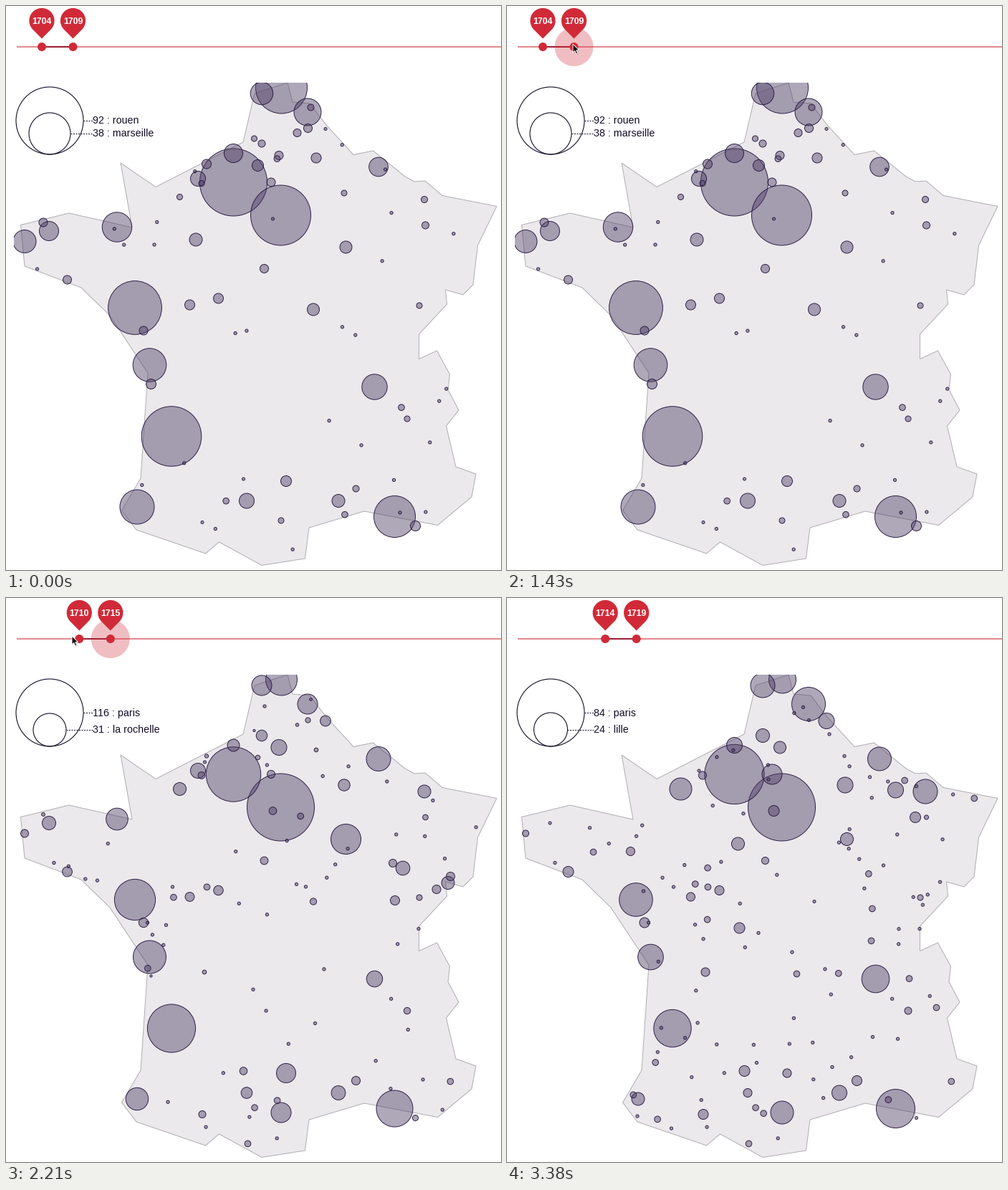
Animation, 691 px wide and 787 px high, one loop 3.51 s. Source, as a matplotlib script:

```python
import numpy as np
import matplotlib.pyplot as plt
from matplotlib.animation import FuncAnimation
from matplotlib.patches import Circle, Polygon, Rectangle
from matplotlib.path import Path

W, H, DPI = 691, 787, 64
PX = 72 / DPI  # points per pixel
FRAMES, STEP = 27, 130
RED, INK = "#d02a38", "#140c26"
YEARS = np.array([1704, 1706, 1710, 1714])
rng = np.random.default_rng(12)

COAST = [
    (393, 107), (347, 122), (331, 190), (209, 252.5), (160, 219),
    (176, 309), (88, 289), (20.5, 305.5), (26, 363), (105, 393),
    (145, 432), (198, 512), (188, 659), (161.5, 704), (182, 731),
    (278.5, 764), (297.5, 748), (357, 780.5), (417.5, 771), (423, 728),
    (500, 705), (602.5, 724.5), (650, 685), (656, 653), (628, 643),
    (614.5, 586), (632, 564), (617, 535.5), (619.5, 514), (601.5, 481),
    (576.5, 492.5), (576.5, 458), (615.5, 416), (613.5, 396), (638, 403),
    (652, 389), (658.5, 334), (685, 279.5), (609, 264.5), (585, 244),
    (570, 245), (557, 238), (512.5, 202), (485, 207.5), (447, 166),
    (424, 136), (400, 134),
]

# Cities: x, y, radius at each of the four key years
CITIES = [
    (357, 122, 15.7, 18, 14, 17), (384.5, 114, 36, 31, 22, 19),
    (421, 148, 19, 19, 14, 23.5), (381, 208.5, 6, 8.5, 11, 8.5),
    (317.5, 205.5, 13, 12.5, 8.5, 11), (370, 246, 6, 6.5, 5.5, 14),
    (268, 241, 10.5, 14.5, 10.5, 2), (317.5, 246, 47, 45, 38.2, 41.6),
    (383.5, 292, 42, 47, 47, 47), (520, 224.5, 13.3, 18, 17, 16.5),
    (584, 270, 4.5, 5.5, 9, 17), (474.5, 336.5, 8.5, 14.5, 21, 9),
    (155, 308.5, 20.7, 24.5, 15.3, 0), (26, 328.5, 16, 14, 5.5, 4.5),
    (60, 314, 13.5, 14, 9.5, 2), (180, 421, 37.4, 35.8, 28.6, 23.3),
    (200.5, 501, 23.3, 24.8, 23, 17.8), (231, 600.5, 41.8, 42.2, 33.6, 26.2),
    (514.5, 531.5, 17.7, 18, 11.2, 19.3), (183, 699, 24, 23, 15.7, 9),
    (542.5, 712.5, 29, 25.9, 25.5, 27), (384, 718, 4, 9.5, 14, 16),
    (391, 663, 7.5, 12, 13.5, 6), (242.5, 266.5, 4, 4, 9, 15.5),
]

# Towns: x, y, first and last radius, changing steadily
TOWNS = [
    (351.5, 222.5, 8, 0), (425.5, 141.5, 4.5, 0), (346.5, 185, 4, 0),
    (357, 192, 5, 9.5), (406.5, 177, 5.5, 0), (421.5, 170.5, 6, 2),
    (446, 171.5, 2, 11), (433, 212, 7, 0), (280, 220.5, 6.5, 0),
    (273, 247.5, 4, 5.5), (372.5, 297, 2, 7.5), (472, 261, 4, 11),
    (585.5, 306, 5, 3), (570, 306, -8, 7.5), (542.5, 268, -16, 11),
    (322.5, 343, -13, 9), (324.5, 460.5, -11, 7.5), (429, 423.5, 8.5, 2),
    (577, 418, 4, 4), (85.5, 382, 6, 7.5), (52, 302, 6, 0),
    (265, 326, 9, -4), (192, 453, 6, 7), (256.5, 417, 7, 6),
    (296.5, 408, 7, 6.5), (202.5, 527.5, 7, -2), (560, 576, 4, 5),
    (331.5, 660, 2, 7.5), (336, 690.5, 10.5, 6), (464, 690.5, 9, 10.5),
    (488.5, 673.5, 4.5, 7), (571.5, 725.5, 7, 2), (274, 720.5, 2, 7),
    (360.5, 366.5, 6, 5), (277, 522, -2, 6), (172.5, 353.5, -9, 6),
]

# Towns seen only around the two middle key years: x, y, radius
MIDDLE = [
    (554, 377, 9.8), (617, 397.5, 9), (540, 370, 5.5), (601, 406.5, 6),
    (620.5, 388.5, 6), (543, 422, 6.5),
]

# How many villages live from one key year to another
LIVES = {(0, 1): 26, (0, 0): 5, (1, 2): 16, (2, 2): 18, (2, 3): 22, (3, 3): 78}


def random_spots(n):
    """Points spread over the land, not too close to each other."""
    inside, spots = Path(COAST), []
    while len(spots) < n:
        p = rng.uniform((20, 150), (680, 770))
        if inside.contains_point(p) and all(np.hypot(*(p - q)) > 13 for q in spots):
            spots.append(p)
    return np.array(spots)


def village_radii():
    rows = []
    for (first, last), n in LIVES.items():
        alive = (np.arange(4) >= first) & (np.arange(4) <= last)
        rows += [alive * (4.3 if rng.random() < 0.15 else 2.1) for _ in range(n)]
    return np.array(rows)


def build_sites():
    cities, towns, middle = map(np.array, (CITIES, TOWNS, MIDDLE))
    t = (YEARS - YEARS[0]) / (YEARS[-1] - YEARS[0])
    steady = towns[:, 2:3] * (1 - t) + towns[:, 3:] * t
    steady[steady < 1.5] = 0
    village = village_radii()
    spots = np.vstack([cities[:, :2], towns[:, :2], middle[:, :2],
                       random_spots(len(village))])
    radii = np.vstack([cities[:, 2:], steady, middle[:, 2:] * [0, 1, 1, 0],
                       village])
    return spots, radii


spots, radii = build_sites()
switch = rng.uniform(0.1, 0.9, len(spots))

TOP = [(92, "rouen"), (117, "paris"), (116, "paris"), (84, "paris")]
LOW = [(38, "marseille"), (38, "marseille"), (31, "la rochelle"), (24, "lille")]
LOW_R = [29, 25.7, 23, 23.5]


def first_year(i):
    if i < 13:
        return 1704
    if i < 18:
        return 1706 + i - 13
    return 1712 if i == 18 else 1714


def pointer(i):
    """Tip of the arrow: slides in, holds the knob, drops out below."""
    if 4 <= i < 8:
        u = (8 - i) / 4
        return 92 - 34 * u, 53 + 277 * u ** 3
    if 8 <= i <= 22:
        return 92, 53
    if 23 <= i <= 25:
        u = (i - 22) / 3
        return 92 + 24 * u, 53 + 717 * u ** 1.7
    return None


def halo_radius(i):
    grow = 1 - np.clip((11 - i) / 4, 0, 1) ** 2
    return 27 * grow * np.clip((22 - i) / 2, 0, 1)


def segment(year):
    k = min(np.searchsorted(YEARS, year, side="right") - 1, 2)
    return k, (year - YEARS[k]) / (YEARS[k + 1] - YEARS[k])


def radii_at(k, t):
    a, b = radii[:, k], radii[:, k + 1]
    steady = (a > 0) & (b > 0)
    return np.where(steady, a + (b - a) * t, np.where(t > switch, b, a))


def label_at(rows, k, t):
    n = rows[k][0] + (rows[k + 1][0] - rows[k][0]) * t
    return f"{round(n)} : {rows[k + (t >= 0.5)][1]}"


fig = plt.figure(figsize=(W / DPI, H / DPI), dpi=DPI, facecolor="white")
ax = fig.add_axes([0, 0, 1, 1])
ax.set_xlim(0, W)
ax.set_ylim(H, 0)
ax.axis("off")


def line(xs, ys, color, width, z, **kw):
    return ax.plot(xs, ys, color=color, lw=width * PX, zorder=z,
                   solid_capstyle="butt", **kw)[0]


def shape(patch, z):
    patch.set_zorder(z)
    return ax.add_patch(patch)


def text(x, y, size, color, **kw):
    return ax.text(x, y, "", fontsize=size * PX, color=color, zorder=8,
                   family="Liberation Sans", **kw)


# Map
frame = Rectangle((11, 107), W - 11, H - 107, transform=ax.transData)
land = shape(Polygon(COAST, fc="#ebe9ec", ec="#b0aeb2", lw=PX), 1)
land.set_clip_path(frame)
bubbles = ax.scatter(spots[:, 0], spots[:, 1], s=1, zorder=2, lw=PX,
                     fc=(0.31, 0.245, 0.395, 0.45), ec=(0.17, 0.11, 0.26, 0.95))
bubbles.set_snap(False)
bubbles.set_clip_path(frame)

# Legend
shape(Circle((61, 160), 47, fill=False, ec=INK, lw=1.1 * PX), 3)
ring = shape(Circle((61, 178), 29, fill=False, ec=INK, lw=1.1 * PX), 3)
line([108, 121], [160, 160], INK, 1, 3, ls=(0, (2, 1.5)))
lead = line([], [], INK, 1, 3, ls=(0, (2, 1.5)))
top_text = text(121, 164.5, 14.2, INK)
low_text = text(121, 182, 14.2, INK)

# Slider
line([15, W], [57, 57], "#e28a8d", 2, 4)
span = line([], [], "#9c1f36", 2, 5)
halo = shape(Circle((93, 57), 0, fc=RED, ec="none", alpha=0.3), 6)
turn = np.radians(np.linspace(44.4, 315.6, 60))
PIN = np.vstack([np.c_[17.6 * np.sin(turn), 20.5 + 17.6 * np.cos(turn)],
                 [(0, 45.5)]])
knobs = [shape(Circle((0, 57), 6, fc=RED, ec="none"), 7) for _ in range(2)]
pins = [shape(Polygon(PIN, fc=RED, ec="none"), 7) for _ in range(2)]
dates = [text(0, 25, 12.4, "white", ha="center", weight="bold")
         for _ in range(2)]

# Pointer
ARROW = np.array([(0, 0), (0, 12), (2.7, 9.5), (4.8, 14), (6.8, 13),
                  (4.8, 8.8), (8.5, 8.5)])
shade = shape(Polygon(ARROW, fc="black", ec="none", alpha=0.2), 9)
arrow = shape(Polygon(ARROW, fc="#111111", ec="white", lw=0.9 * PX), 10)


def draw(i):
    year = first_year(i)
    k, t = segment(year)

    r = radii_at(k, t)
    order = np.argsort(-r, kind="stable")
    order = order[r[order] > 0]
    bubbles.set_offsets(spots[order])
    bubbles.set_sizes((2 * r[order] * PX) ** 2)

    low = LOW_R[k] + (LOW_R[k + 1] - LOW_R[k]) * t
    mid = 207 - low
    ring.set_radius(low)
    ring.set_center((61, mid))
    lead.set_data([61 + low, 121], [mid, mid])
    top_text.set_text(label_at(TOP, k, t))
    low_text.set_text(label_at(LOW, k, t))
    low_text.set_y(mid + 4.3)

    x0 = 50 + (year - 1704) * 8.72
    ends = (x0, x0 + 43.5)
    span.set_data(ends, [57, 57])
    for x, knob, pin, date, y in zip(ends, knobs, pins, dates, (year, year + 5)):
        knob.set_center((x, 57))
        pin.set_xy(PIN + (x, 0))
        date.set_x(x)
        date.set_text(str(y))
    halo.set_center((ends[1], 57))
    halo.set_radius(halo_radius(i))

    tip = pointer(i)
    for part, shift in ((arrow, 0), (shade, 1.2)):
        part.set_visible(tip is not None)
        if tip:
            part.set_xy(ARROW + tip + shift)
    return []


anim = FuncAnimation(fig, draw, frames=FRAMES, interval=STEP, repeat=True,
                     repeat_delay=0, init_func=lambda: draw(0))
plt.show()
```
